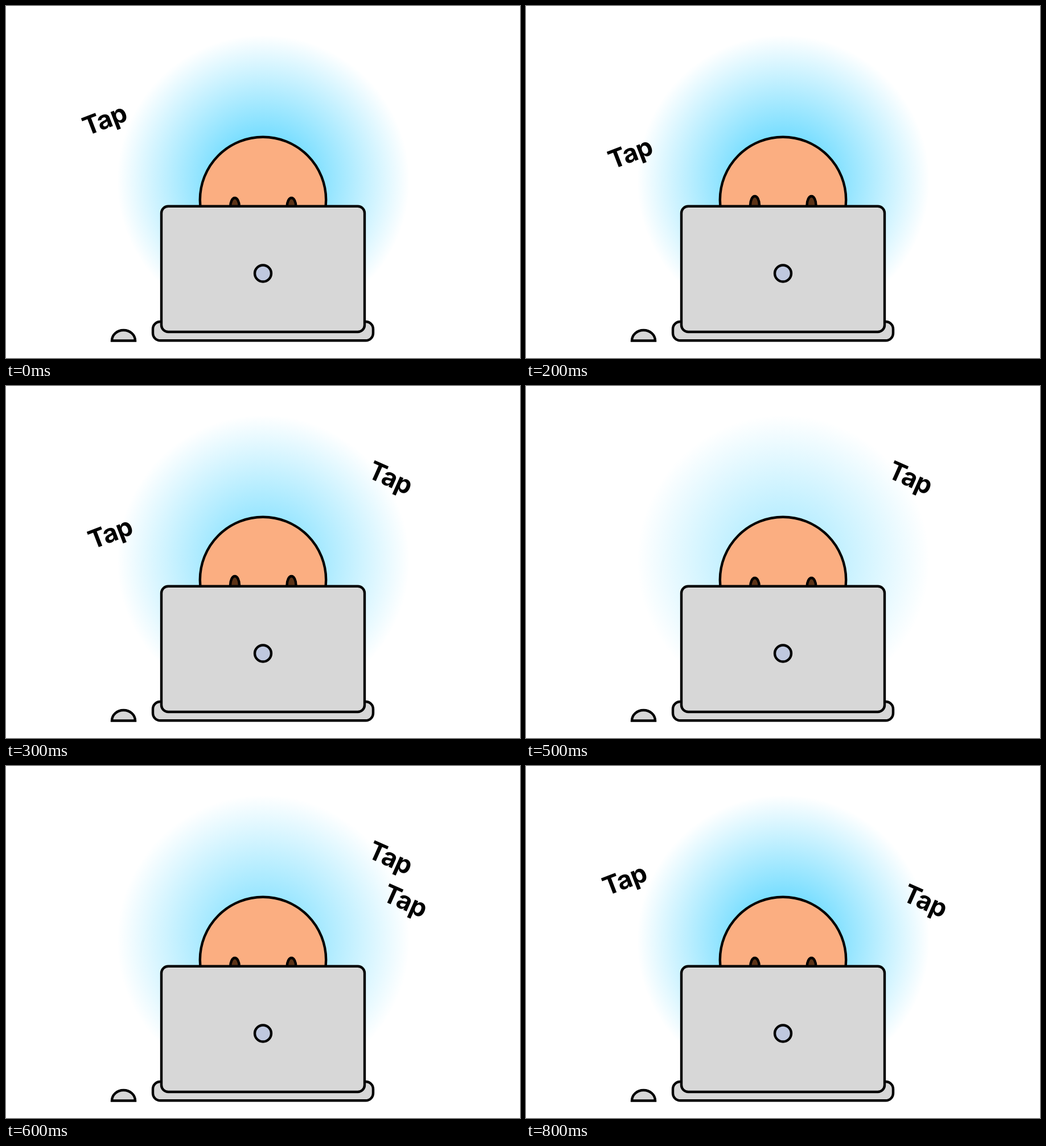
An HTML page that plays this animation: 903x620 px, repeating every 0.9 s.

```html
<!DOCTYPE html>
<html lang="en">
<head>
<meta charset="utf-8">
<title>Typing</title>
<style>
  html, body { margin: 0; width: 100%; height: 100%; overflow: hidden; background: #fff; }
  svg { display: block; width: 100%; height: 100%; }
  .line { stroke: #000; stroke-width: 4.4; }
  .grey { fill: #d7d7d7; }
  text { font: 700 45px Inter, "Liberation Sans", sans-serif; letter-spacing: -.02em; }
</style>
</head>
<body>
<svg viewBox="0 0 903 620">
  <defs>
    <radialGradient id="light">
      <stop offset="0" stop-color="#3ccfff"/>
      <stop offset="1" stop-color="#3ccfff" stop-opacity="0"/>
    </radialGradient>
  </defs>
  <circle id="glow" cx="452" cy="308" r="257" fill="url(#light)"/>
  <circle class="line" cx="451.5" cy="341.5" r="110.7" fill="#fbae81"/>
  <g id="eyes" class="line" fill="#5c3317">
    <ellipse cx="402" cy="354" rx="8" ry="16"/>
    <ellipse cx="501.5" cy="354" rx="8" ry="16"/>
  </g>
  <g class="line grey">
    <rect x="258" y="556" width="387" height="33.3" rx="13"/>
    <rect x="273" y="352.7" width="357" height="221.3" rx="12"/>
    <path d="M186 589.5A20.5 18.5 0 0 1 227 589.5Z"/>
  </g>
  <circle class="line" cx="451.5" cy="471" r="14.5" fill="#bfc8df"/>
  <g id="taps">
    <text transform="translate(142 229) rotate(-21)">Tap</text>
    <text transform="translate(152 288) rotate(-21)">Tap</text>
    <text transform="translate(633 160) rotate(24)">Tap</text>
    <text transform="translate(659 236) rotate(24)">Tap</text>
  </g>
</svg>
<script>
  const STEP = 100, STEPS = 9;
  const glow = document.getElementById("glow");
  const eyes = document.getElementById("eyes");
  const taps = [...document.querySelectorAll("#taps text")];
  // First step and number of steps for which each word shows
  const spans = [[8, 3], [1, 3], [3, 4], [6, 3]];

  function draw(now) {
    const step = Math.floor(now / STEP) % STEPS;
    const within = ([start, length]) => (step - start + STEPS) % STEPS < length;
    taps.forEach((tap, i) => tap.setAttribute("visibility", within(spans[i]) ? "visible" : "hidden"));

    // The light dims around the middle of the loop
    const distance = Math.abs(step - 4.5);
    glow.setAttribute("opacity", Math.min(1, 0.5 + (distance - 0.5) * 0.25));
    eyes.setAttribute("transform", `translate(0 ${within([1, 3]) ? -3 : 0})`);
  }

  const begin = performance.now();
  function tick() {
    draw(performance.now() - begin);
    requestAnimationFrame(tick);
  }
  draw(0);
  requestAnimationFrame(tick);
</script>
</body>
</html>
```
